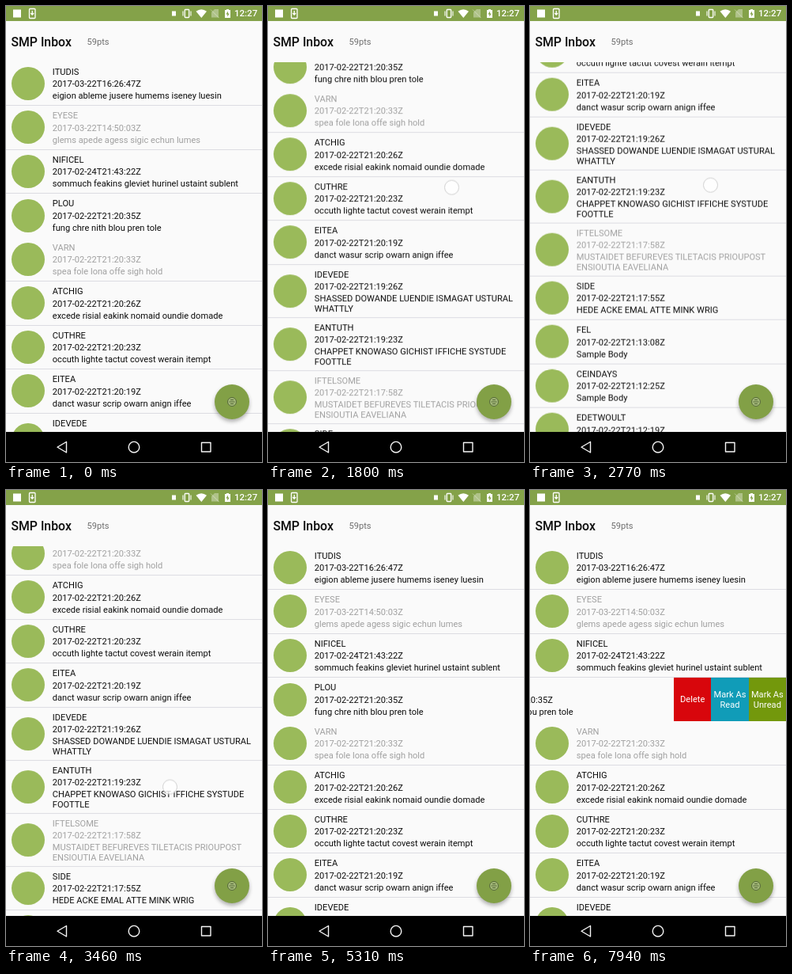
An HTML page that plays this animation: 324 px wide and 576 px high, repeating every 7.99 s.

```html
<!DOCTYPE html>
<html lang="en">
<head>
<meta charset="utf-8">
<title>Inbox</title>
<style>
  :root { --bg: #fafafa; --green: #84a249; --rule: #dcdce2; --loop: 7990ms; }
  * { box-sizing: border-box; }
  html, body { margin: 0; width: 100%; height: 100%; overflow: hidden; background: var(--bg); }
  #stage {
    position: relative; width: 324px; height: 576px; overflow: hidden;
    background: var(--bg); color: #0c0c0c; white-space: nowrap;
    font: 11.1px Roboto, sans-serif;
  }
  #stage > * { position: absolute; }

  .status { left: 0; top: 0; width: 324px; height: 19px; background: var(--green); }
  .status span { position: absolute; left: 289px; top: 0; font: 500 11.5px/19px Roboto, sans-serif; color: #fff; }
  .status svg, .nav svg { display: block; }
  h1 { left: 6.5px; top: 34px; margin: 0; font: 500 15.8px/23px Roboto, sans-serif; }
  .points { left: 102.5px; top: 38px; line-height: 15px; color: #6e6e6e; }
  .nav { left: 0; top: 538px; width: 324px; height: 38px; background: #000; }

  .view { left: 0; top: 70.5px; width: 324px; height: 467.5px; overflow: hidden; }
  .list { animation: scroll var(--loop) linear infinite; }
  .row { position: relative; height: 55.5px; border-bottom: 1px solid var(--rule); }
  .row.tall { height: 67px; }
  .face { position: absolute; inset: 0; padding: 5.25px 0 0 58.8px; line-height: 15.5px; }
  .read .face { color: #a0a0a0; }
  .face i {
    position: absolute; left: 7px; top: 50%; width: 42px; height: 42px; margin-top: -21px;
    border-radius: 50%; background: #9aba5a;
  }
  .face p { margin: .25px 0 0; line-height: 13px; }

  .swipe { overflow: hidden; border-color: transparent; }
  .slider { position: absolute; inset: 0 0 -1px; animation: swipe var(--loop) linear infinite; }
  .actions { position: absolute; left: 324px; top: 0; height: 100%; display: flex; }
  .actions b {
    width: 47.33px; display: flex; align-items: center; justify-content: center;
    font-weight: 400; line-height: 13px; text-align: center; color: #fff;
  }
  .line { position: absolute; left: 0; bottom: 0; width: 324px; height: 1px; background: var(--rule); }

  .fab {
    left: 264px; top: 478px; width: 44px; height: 44px; border-radius: 50%;
    background: #82a046; box-shadow: 0 3px 5px rgba(0, 0, 0, .3);
  }
  .touch {
    left: -9.5px; top: -9.5px; width: 19px; height: 19px; border-radius: 50%;
    background: rgba(255, 255, 255, .8); border: 1px solid #cfcfcf;
    animation: move var(--loop) linear infinite, show var(--loop) step-end infinite;
  }

  /* Steady drags, each followed by a slowing fling */
  @keyframes scroll {
    0%, 16.27% { transform: translateY(0); }
    22.53% { transform: translateY(-187.5px); }
    23.28% { transform: translateY(-210px); animation-timing-function: cubic-bezier(.1, .6, .4, 1); }
    30.29% { transform: translateY(-255px); }
    34.67% { transform: translateY(-374px); }
    35.42% { transform: translateY(-396px); animation-timing-function: cubic-bezier(.2, .8, .4, 1); }
    38.3% { transform: translateY(-410px); }
    43.3% { transform: translateY(-240.5px); }
    43.93% { transform: translateY(-221px); animation-timing-function: cubic-bezier(.1, .6, .4, 1); }
    48.56% { transform: translateY(-180px); }
    52.57% { transform: translateY(-67px); }
    53.44% { transform: translateY(-41px); animation-timing-function: cubic-bezier(.2, .6, .4, 1); }
    57.57%, 100% { transform: translateY(0); }
  }
  @keyframes move {
    0%, 16.27% { transform: translate(228px, 420px); }
    22.53% { transform: translate(232px, 229px); }
    23.28% { transform: translate(233px, 206.5px); }
    30.29% { transform: translate(236px, 345px); }
    34.67% { transform: translate(228px, 226px); }
    35.42% { transform: translate(227px, 204px); }
    38.3% { transform: translate(205px, 204.5px); }
    43.3% { transform: translate(207px, 374px); }
    43.93% { transform: translate(207px, 393.5px); }
    48.56% { transform: translate(222px, 230px); }
    52.57% { transform: translate(221px, 343px); }
    53.44% { transform: translate(221px, 369px); }
    86%, 86.73% { transform: translate(265px, 265px); animation-timing-function: ease-in-out; }
    95.62%, 100% { transform: translate(123px, 266px); }
  }
  @keyframes show {
    0%, 23.28%, 35.42%, 43.93%, 53.44%, 96.37%, 100% { opacity: 0; }
    16.15%, 30.29%, 38.3%, 48.56%, 86.11% { opacity: 1; }
  }
  @keyframes swipe {
    0%, 86.73% { transform: translateX(0); animation-timing-function: ease-in-out; }
    95.62%, 100% { transform: translateX(-142px); }
  }
</style>
</head>
<body>
<div id="stage">
  <h1>SMP Inbox</h1>
  <div class="points">59pts</div>
  <div class="view"><div class="list"></div></div>

  <div class="fab">
    <svg width="44" height="44" fill="none" stroke="#56693a">
      <circle cx="22" cy="22" r="5.5" fill="#a3b878"/>
      <path d="M18.5 22h7M20 19.5h4M20 24.5h4"/>
    </svg>
  </div>

  <div class="status">
    <svg width="324" height="19" fill="#fff">
      <rect x="9" y="4.5" width="10" height="10"/>
      <g fill="none" stroke="#fff" stroke-width="1.3">
        <rect x="29.5" y="3.5" width="7.5" height="12" rx="1"/>
        <path d="M33.25 6v5M31.2 9l2 2 2-2"/>
        <rect x="226.3" y="4.5" width="5.4" height="10" rx=".8"/>
        <path d="M224 6.5v6M234 6.5v6" stroke-width="1.1"/>
      </g>
      <rect x="210" y="6.5" width="5" height="6"/>
      <path d="M240.5 6.8Q247.3 1.6 254 6.8L247.3 15Z"/>
      <path d="M264 4h5v10.5h-9V8Z" opacity=".35"/>
      <path d="M259 4.5l10.5 10.5" stroke="#fff" opacity=".4"/>
      <path d="M277 5h2V4h3v1h2v10h-7Z"/>
      <path d="M281 6.5l-2.6 4h1.8v3l2.5-4H281Z" fill="#84a249"/>
    </svg>
    <span>12:27</span>
  </div>

  <div class="nav">
    <svg width="324" height="38" fill="none" stroke="#f6f6f6" stroke-width="1.4" stroke-linejoin="round">
      <path d="M76.5 12.5v13.5L65 19.25Z"/>
      <circle cx="162" cy="19.2" r="6.8"/>
      <rect x="247.5" y="13.5" width="11.5" height="11.5"/>
    </svg>
  </div>

  <div class="touch"></div>
</div>

<script>
  // name | date and time | body ("/" wraps) | flag: r = read, s = swiped
  const mails = `
ITUDIS|03-22T16:26:47|eigion ableme jusere humems iseney luesin|
EYESE|03-22T14:50:03|glems apede agess sigic echun lumes|r
NIFICEL|02-24T21:43:22|sommuch feakins gleviet hurinel ustaint sublent|
PLOU|02-22T21:20:35|fung chre nith blou pren tole|s
VARN|02-22T21:20:33|spea fole lona offe sigh hold|r
ATCHIG|02-22T21:20:26|excede risial eakink nomaid oundie domade|
CUTHRE|02-22T21:20:23|occuth lighte tactut covest werain itempt|
EITEA|02-22T21:20:19|danct wasur scrip owarn anign iffee|
IDEVEDE|02-22T21:19:26|SHASSED DOWANDE LUENDIE ISMAGAT USTURAL/WHATTLY|
EANTUTH|02-22T21:19:23|CHAPPET KNOWASO GICHIST IFFICHE SYSTUDE/FOOTTLE|
IFTELSOME|02-22T21:17:58|MUSTAIDET BEFUREVES TILETACIS PRIOUPOST/ENSIOUTIA EAVELIANA|r
SIDE|02-22T21:17:55|HEDE ACKE EMAL ATTE MINK WRIG|
FEL|02-22T21:13:08|Sample Body|
CEINDAYS|02-22T21:12:25|Sample Body|
EDETWOULT|02-22T21:12:19|Sample Body|`;

  const actions = [['Delete', '#d8060c'], ['Mark As<br>Read', '#109cb8'], ['Mark As<br>Unread', '#73980c']]
    .map(([label, color]) => `<b style="background:${color}">${label}</b>`).join('');

  const row = mail => {
    const [name, date, body, flag] = mail.split('|');
    const kind = (body.includes('/') ? ' tall' : '') + ({ r: ' read', s: ' swipe' }[flag] || '');
    const face = `<div class="face"><i></i>${name}<br>2017-${date}Z<p>${body.replace('/', '<br>')}</p></div>`;
    const inner = flag === 's'
      ? `<div class="slider">${face}<div class="line"></div><div class="actions">${actions}</div></div>`
      : face;
    return `<div class="row${kind}">${inner}</div>`;
  };

  document.querySelector('.list').innerHTML = mails.trim().split('\n').map(row).join('');
</script>
</body>
</html>
```
